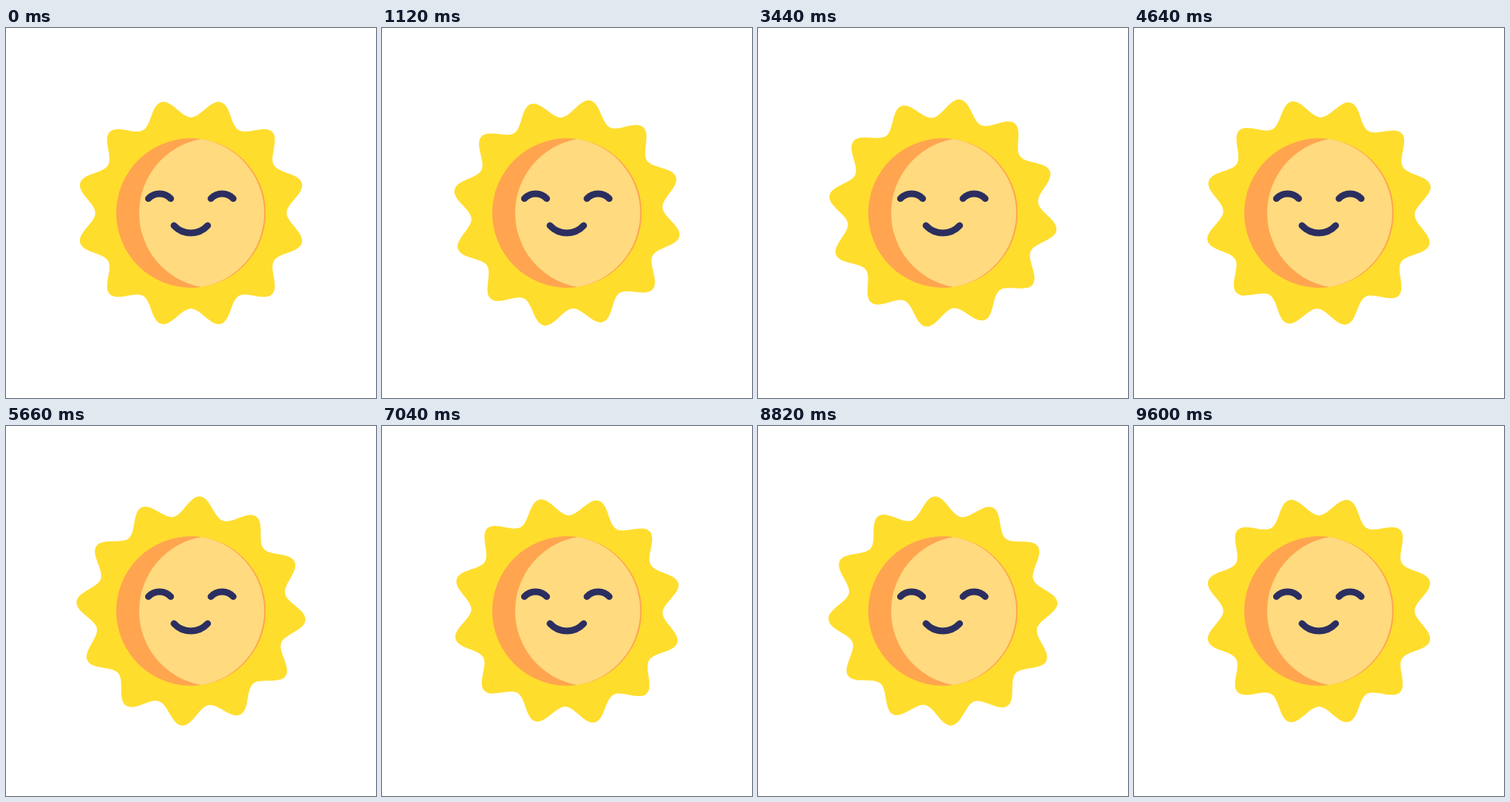
Animation of 500x500 px, one loop 9.64 s. Source, as an HTML page:

```html
<!DOCTYPE html>
<html lang="en">
<head>
<meta charset="utf-8">
<title>Smiling sun</title>
<style>
  html, body { margin: 0; width: 100%; height: 100%; overflow: hidden; background: #fff; }
  svg { display: block; width: 100%; height: 100%; }
  .line { fill: none; stroke: #2b2e60; stroke-width: 9.1; stroke-linecap: round; }
</style>
</head>
<body>
<svg viewBox="0 0 500 500">
  <g transform="translate(250 250)"><path id="rays" fill="#ffdd2d"/></g>
  <circle cx="250" cy="250" r="101" fill="#ffa550"/>
  <path fill="#ffda7f" d="M264 150A101.5 101.5 0 0 0 264 350A101.35 101.35 0 0 0 264 150Z"/>
  <g class="line">
    <path d="M192.5 230.5A20.6 20.6 0 0 1 222.5 230.5"/>
    <path d="M277 230.5A20.6 20.6 0 0 1 307 230.5"/>
    <path d="M227 267A30.9 30.9 0 0 0 272.5 267"/>
  </g>
</svg>
<script>
  const rays = document.getElementById('rays');
  const RAYS = 12, TIP = 155.1, NOTCH = 129.3, TIP_HANDLE = 14, NOTCH_HANDLE = 13;
  const SWING = 10.8, THIRD = 800, LAST = 9600, LOOP = 9640, STEP = 20;

  // Point at a radius and clockwise angle from the top, shifted along the tangent.
  function point(radius, angle, shift) {
    const s = Math.sin(angle), c = Math.cos(angle);
    return (radius * s + shift * c).toFixed(2) + ' ' + (shift * s - radius * c).toFixed(2);
  }

  function outline() {
    const half = Math.PI / RAYS;
    let d = 'M' + point(NOTCH, 0, 0);
    for (let i = 0; i < RAYS; i++) {
      const a = 2 * i * half, tip = a + half, b = tip + half;
      d += 'C' + [point(NOTCH, a, NOTCH_HANDLE), point(TIP, tip, -TIP_HANDLE), point(TIP, tip, 0)];
      d += 'C' + [point(TIP, tip, TIP_HANDLE), point(NOTCH, b, -NOTCH_HANDLE), point(NOTCH, b, 0)];
    }
    return d + 'Z';
  }

  const ease = p => (1 - Math.cos(Math.PI * p)) / 2;

  // Swings from rest to the left, over to the right, and back to rest.
  function angleAt(time) {
    const stops = [0, -SWING, SWING, 0];
    const phase = (time % (3 * THIRD)) / THIRD;
    const i = Math.floor(phase);
    return stops[i] + (stops[i + 1] - stops[i]) * ease(phase - i);
  }

  function draw() {
    const time = Math.floor((performance.now() % LOOP) / STEP) * STEP;
    rays.setAttribute('transform', `rotate(${angleAt(Math.min(time, LAST))})`);
    requestAnimationFrame(draw);
  }

  rays.setAttribute('d', outline());
  draw();
</script>
</body>
</html>
```
